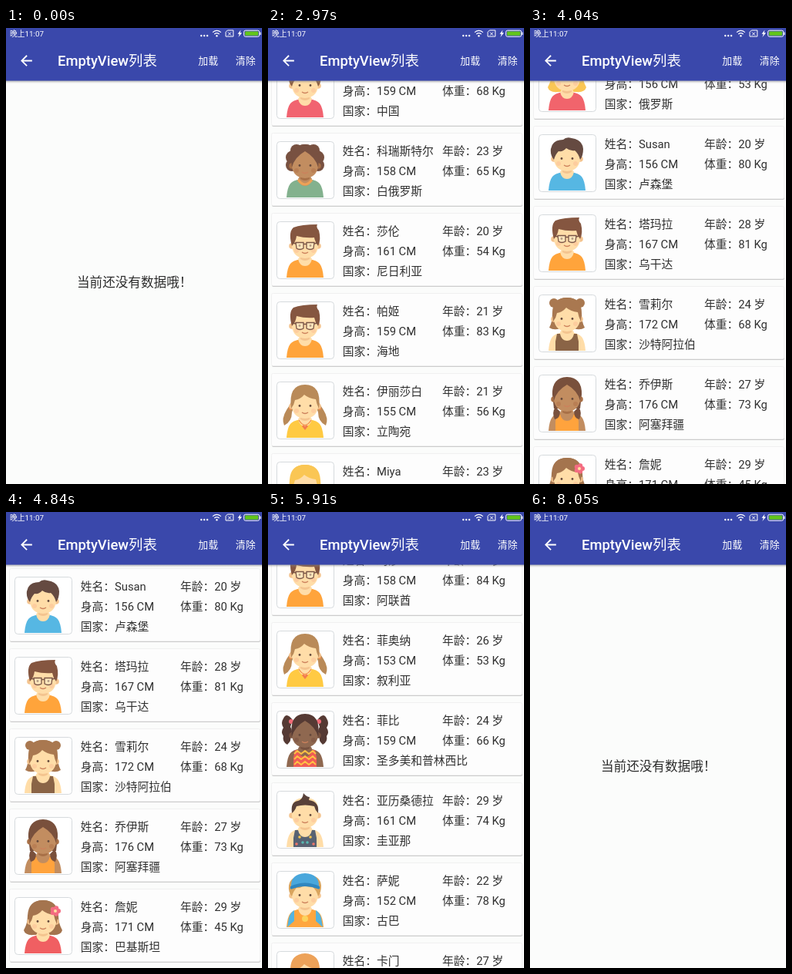
An HTML page that plays this animation: 332 by 592 pixels, repeating every 8.44 s.

```html
<!DOCTYPE html>
<html lang="zh-CN">
<head>
<meta charset="utf-8">
<title>EmptyView列表</title>
<style>
html, body { margin: 0; width: 100%; height: 100%; overflow: hidden; background: #fbfcfb; }
svg { display: block; }
#stage { width: 100vw; height: 100vh; font-family: Roboto, "Noto Sans CJK SC", "Noto Sans CJK", sans-serif; }
.row text { font-size: 14.76px; fill: #303030; }
.bar text { fill: #fff; }
#empty { font-size: 16.6px; fill: #2b2b2b; animation: empty 8440ms step-end infinite; }
#list { animation: show 8440ms step-end infinite; }
#rows { animation: scroll 8440ms step-end infinite; }
@keyframes empty {
  0% { visibility: visible; }
  9.59% { visibility: hidden; }
  76.3%, 100% { visibility: visible; }
}
@keyframes show {
  0% { visibility: hidden; }
  9.59% { visibility: visible; }
  76.3%, 100% { visibility: hidden; }
}
@keyframes scroll {
  0% { transform: translateY(0); }
  31.99% { transform: translateY(-250px); }
  35.18% { transform: translateY(-560px); }
  38.38% { transform: translateY(-800px); }
  41.46% { transform: translateY(-930px); }
  44.66% { transform: translateY(-950px); }
  47.86% { transform: translateY(-1193px); }
  51.06% { transform: translateY(-1237px); }
  54.14% { transform: translateY(-1247px); }
  60.54% { transform: translateY(-1400px); }
  63.74% { transform: translateY(-1640px); }
  66.82% { transform: translateY(-1770px); }
  70.02%, 100% { transform: translateY(-1801px); }
}
</style>
</head>
<body>
<svg id="stage" viewBox="0 0 332 592">
  <defs>
    <linearGradient id="shade" x2="0" y2="1">
      <stop stop-color="#777" stop-opacity=".6"/>
      <stop offset="1" stop-color="#999" stop-opacity="0"/>
    </linearGradient>
  </defs>
  <rect width="332" height="592" fill="#fbfcfb"/>
  <text id="empty" x="92" y="336.3">当前还没有数据哦！</text>
  <g id="list"><g id="rows"></g></g>

  <g class="bar">
    <rect y="68" width="332" height="4" fill="url(#shade)"/>
    <rect width="332" height="68.5" fill="#3a48ab"/>
    <text x="5" y="11" font-size="9.8">晚上11:07</text>
    <path transform="translate(15.4 31.4) scale(.922)" fill="#fff"
      d="M20 11H7.83l5.59-5.59L12 4l-8 8 8 8 1.41-1.41L7.83 13H20z"/>
    <text x="67" y="49.3" font-size="18.4" font-weight="500">EmptyView<tspan font-weight="400">列表</tspan></text>
    <text x="249.3" y="47" font-size="12.9">加载</text>
    <text x="297.8" y="47" font-size="12.9">清除</text>
    <g fill="#fff">
      <circle cx="253.3" cy="10" r="1.2"/><circle cx="257.2" cy="10" r="1.2"/><circle cx="261.1" cy="10" r="1.2"/>
      <circle cx="273.4" cy="10.3" r="1.2"/>
      <path d="M304.5 2.5L300.5 7.8H302.8L301.3 12L306 6.3H303.5Z"/>
    </g>
    <g fill="none" stroke="#fff" stroke-width="1.2">
      <path d="M268 5.6q5.4-4.4 10.8 0M270.2 8q3.2-2.6 6.4 0"/>
      <path stroke-width="1" d="M287.3 3H294.8V11H285V5.3ZM288 5.5l4 4m0-4l-4 4"/>
      <rect x="308.6" y="3.2" width="20" height="8" rx="2" stroke-width="1"/>
      <path d="M330 5.5v3.5"/>
    </g>
    <rect x="310" y="4.6" width="17.2" height="5.2" rx=".8" fill="#62c51b"/>
  </g>
</svg>
<script>
const people = `奥帕|23|151|47|菲律宾|wavy
弗雷德里卡|22|160|61|坦桑尼亚|puffs
娜塔莎|27|177|82|荷兰|collar
弗里达|23|153|65|乌干达|teal
茉莉|24|154|62|坦桑尼亚|ginger
安琪|25|159|68|中国|red
科瑞斯特尔|23|158|65|白俄罗斯|afro
莎伦|20|161|54|尼日利亚|glasses
帕姬|21|159|83|海地|glasses
伊丽莎白|21|155|56|立陶宛|tails
Miya|23|162|58|芬兰|blonde
艾米|26|156|53|俄罗斯|blonde
Susan|20|156|80|卢森堡|sky
塔玛拉|28|167|81|乌干达|glasses
雪莉尔|24|172|68|沙特阿拉伯|buns
乔伊斯|27|176|73|阿塞拜疆|sleek
詹妮|29|171|45|巴基斯坦|flower
玛莎|22|158|84|阿联酋|glasses
菲奥纳|26|153|53|叙利亚|tails
菲比|24|159|66|圣多美和普林西比|puffs
亚历桑德拉|29|161|74|圭亚那|spiky
萨妮|22|152|78|古巴|cap
卡门|27|165|60|智利|ginger`.split('\n').map(line => line.split('|'));

const path = (d, fill, extra = '') => `<path d="${d}" fill="${fill}" ${extra}/>`;
const dot = (x, y, r, fill) => `<circle cx="${x}" cy="${y}" r="${r}" fill="${fill}"/>`;
const pair = (x, y, r, fill) => dot(37 - x, y, r, fill) + dot(37 + x, y, r, fill);
const mirror = shape => shape + `<g transform="matrix(-1 0 0 1 74 0)">${shape}</g>`;
const line = (d, color, width) => path(d, 'none', `stroke="${color}" stroke-width="${width}"`);

// Each tone is [skin, shadow, cheek].
const fair = ['#ffdda8', '#f4c48f', '#fdcd9e'];
const tan = ['#c28d60', '#a87047', '#b97f54'];
const dark = ['#8f6850', '#76513f', '#845c48'];

const looks = {
  wavy: { hair: '#76523f', shirt: '#27bfa5', back: 'long', front: 'part' },
  puffs: { tone: dark, hair: '#553a34', shirt: '#f15c55', back: 'puffs', front: 'part', extra: 'zigzag', tank: 1 },
  collar: { hair: '#a87443', shirt: '#8fbdec', front: 'short', extra: 'collar' },
  teal: { hair: '#594039', shirt: '#25bea1', front: 'quiff' },
  ginger: { hair: '#eda259', shirt: '#f16360', back: 'long', front: 'bangs' },
  red: { hair: '#8d6042', shirt: '#f16370', front: 'short' },
  afro: { tone: tan, hair: '#785141', shirt: '#83b18e', back: 'afro', front: 'part', extra: 'trim' },
  glasses: { hair: '#855640', shirt: '#ffa43b', front: 'quiff', extra: 'glasses' },
  tails: { hair: '#b98a58', shirt: '#ffca43', back: 'tails', front: 'bangs', extra: 'heart' },
  blonde: { hair: '#fac654', shirt: '#f1646c', back: 'bob', front: 'bangs' },
  sky: { hair: '#654a41', shirt: '#56b7e3', front: 'short' },
  buns: { hair: '#a97850', shirt: '#8a6446', back: 'buns', front: 'bangs', tank: 1 },
  sleek: { tone: tan, hair: '#79503c', shirt: '#ffa33d', back: 'sleek', front: 'part', tank: 1 },
  flower: { hair: '#a4744e', shirt: '#f05f62', back: 'bob', front: 'bangs', extra: 'flower' },
  spiky: { hair: '#584139', shirt: '#586272', front: 'spike', extra: 'spots', tank: 1 },
  cap: { hair: '#d9a45d', shirt: '#ffa63f', front: 'short', extra: 'cap' }
};

const backs = {
  long: c => path('M37 3Q18 4 18 24Q18 34 11 45Q6 59 20 62H54Q68 59 63 45Q56 34 56 24Q56 4 37 3Z', c),
  bob: c => path('M37 4Q18 4 17 24Q17 34 12 43Q14 50 25 49H49Q60 50 62 43Q57 34 57 24Q56 4 37 4Z', c),
  sleek: c => path('M37 3Q17 4 18 26L20 44H54L56 26Q57 4 37 3Z', c),
  afro: c => dot(37, 20, 16, c) + pair(16, 21, 9, c) + pair(11, 12, 8, c) + pair(17, 31, 8, c),
  buns: c => pair(17, 11, 6, c) + path('M37 4Q18 4 18 24Q18 36 14 43Q20 47 28 44H46Q54 47 60 43Q56 36 56 24Q56 4 37 4Z', c),
  puffs: c => mirror(path('M21 12Q13 1 9 10Q5 16 9 22Q5 28 9 33Q7 40 14 44Q20 39 18 32Q22 27 18 21Z', c) + dot(19, 14, 3, '#f16a76')),
  tails: c => mirror(path('M22 22Q17 31 13 37Q6 48 10 57Q20 52 20 40L24 28Z', c) + dot(18, 35, 2, '#f18b4a'))
};

const fronts = {
  short: 'M20 33Q15 27 16 19Q18 7 32 7Q36 3 43 5Q57 7 58 19Q58 28 54 33Q52 25 47 21Q41 22 36 18Q32 23 26 22Q22 26 20 33Z',
  quiff: 'M20 32Q15 14 22 8Q32 4 53 4Q51 8 55 12Q58 24 54 32Q50 27 49 21Q37 22 26 19Q25 27 20 32Z',
  part: 'M20 34Q16 4 37 4Q58 4 54 34Q51 21 37 13Q23 21 20 34Z',
  bangs: 'M19 35Q15 4 37 4Q59 4 55 35Q52 29 51 23Q42 22 36 17Q31 23 24 24Q23 30 19 35Z',
  spike: 'M20 29Q18 14 28 13Q34 11 35 3Q39 8 43 8L42 12Q56 14 54 29Q50 25 49 20Q37 17 26 20Q24 26 20 29Z'
};

const collar = color => mirror(path('M29 48L37 54L31 60L25 50Z', color));

const extras = {
  zigzag: () => [56, 63, 70].map(y => line(`M23 ${y}l4-4 5 4 5-4 5 4 5-4 4 4`, '#ffc144', 2)).join(''),
  collar: () => collar('#bddcf8'),
  trim: () => line('M28 50Q37 62 46 50', '#eda257', 3),
  glasses: () => mirror(path('M25 27.5h10v7.5q-5 3-9 0z', '#fff0cf', 'fill-opacity=".5" stroke="#795546" stroke-width="1.3"') +
    line('M35 29.5h2M25 29l-4-1', '#795546', 1.3)),
  heart: () => line('M29 50Q37 63 45 50', '#f18a3e', 1.2) + path('M37 63l-4-5q2-3 4 0q2-3 4 0z', '#f27d4f'),
  flower: () => [0, 1, 2, 3, 4].map(i =>
    dot(53 + 4 * Math.cos(i * 1.257), 18 + 4 * Math.sin(i * 1.257), 3, '#f46c82')).join('') + dot(53, 18, 2, '#ffe0a0'),
  spots: () => pair(7, 60, 1.8, '#f4c34c') + pair(3, 67, 1.8, '#56b8b2') + pair(11, 69, 1.8, '#ee766b'),
  cap: () => path('M19 21Q18 4 37 3Q56 4 55 21Q37 13 19 21Z', '#49a7dc') +
    path('M18 20Q37 11 56 20Q57 25 53 23Q37 17 21 23Q17 25 18 20Z', '#2f86bf') +
    mirror(path('M14 73L16 61Q18 54 23 51L23 65Z', '#55b4df')) + dot(37, 62, 4, '#fbd35d')
};

const torso = 'M13 73Q14 60 18 55Q21 51 31 49H43Q53 51 56 55Q60 60 61 73Z';
const tank = 'M22 73V61L24 51H28Q30 60 37 60Q44 60 46 51H50L52 61V73Z';
const neckline = 'M28 49Q30 58 37 58Q44 58 46 49L43 44H31Z';

function avatar(key) {
  const look = looks[key], [skin, shade, cheek] = look.tone || fair;
  return (look.back ? backs[look.back](look.hair) : '') +
    path(torso, look.tank ? skin : look.shirt) +
    (look.tank ? path(tank, look.shirt) : '') +
    path(neckline, skin) +
    path('M31 43H43V49Q37 53 31 49Z', shade) +
    pair(17, 32, 3.8, shade) +
    path('M20 24Q20 9 37 9Q54 9 54 24V33Q52 47 37 48Q22 47 20 33Z', skin) +
    pair(11, 38, 3, cheek) +
    path(fronts[look.front], look.hair) +
    pair(7, 31.5, 1.4, '#65493c') +
    line('M33 40q4 3 8 0', '#cc815c', 1.3) +
    (look.back === 'sleek' ? mirror(path('M22 42Q17 49 21 58Q28 57 28 48Z', look.hair)) : '') +
    (look.extra ? extras[look.extra]() : '');
}

const field = (x, y, label, value) => `<text x="${x}" y="${y}">${label}：${value}</text>`;

document.getElementById('rows').innerHTML = people.map(([name, age, height, weight, country, key], i) => `
  <g class="row" transform="translate(0 ${96 + 104 * i})">
    <rect x="5" y="-22" width="325" height="94" rx="2" fill="#ccc"/>
    <rect x="4.5" y="-23.5" width="325" height="94" rx="2" fill="#fdfdfd" stroke="#f0f0f0"/>
    <g transform="translate(11 -13)">
      <rect x=".5" y=".5" width="74" height="74" rx="4" fill="#fff" stroke="#d6dadd"/>
      ${avatar(key)}
    </g>
    ${field(96.8, 5.3, '姓名', name)}${field(226, 5.3, '年龄', age + ' 岁')}
    ${field(96.8, 31, '身高', height + ' CM')}${field(226, 31, '体重', weight + ' Kg')}
    ${field(96.8, 56.6, '国家', country)}
  </g>`).join('');
</script>
</body>
</html>
```
